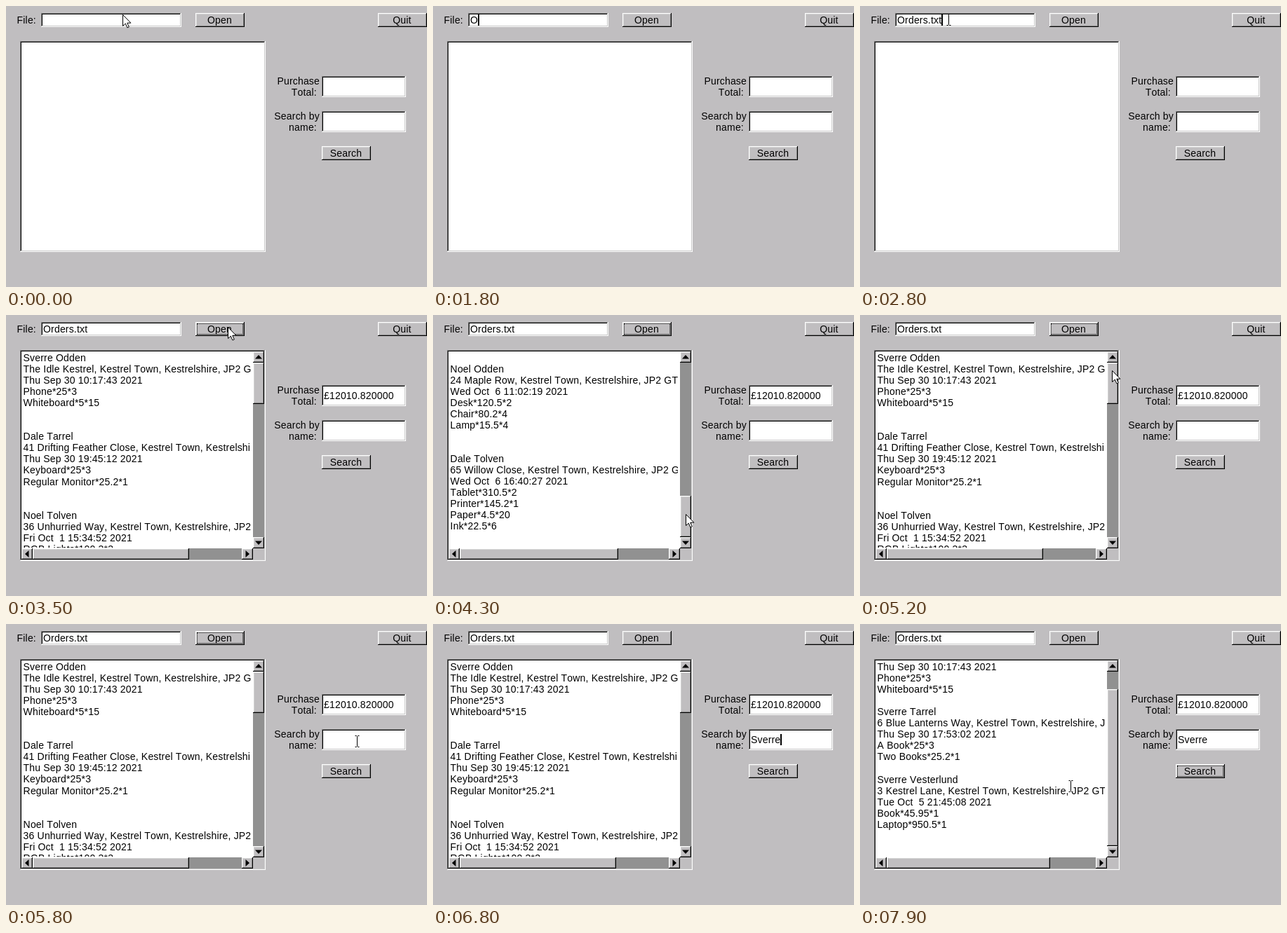
Write an HTML page that moves like this. It is 600 px wide and 401 px high and loops after 8 s.

```html
<!DOCTYPE html>
<html lang="en">
<head>
<meta charset="utf-8">
<title>Order viewer</title>
<style>
  html, body { margin: 0; width: 100%; height: 100%; overflow: hidden; background: #c0bec0; }
  body { position: relative; font: 14px/16px "Liberation Sans", Arial, sans-serif; font-kerning: none; letter-spacing: .18px; color: #000; white-space: pre; }
  div, svg { position: absolute; box-sizing: border-box; }
  .up { background: #c0bec0; box-shadow: inset -1px -1px #000, inset 1px 1px #fff, inset -2px -2px #808080, inset 2px 2px #d4d4d4; }
  .down, .pressed { background: #fff; box-shadow: inset -1px -1px #fff, inset 1px 1px #808080, inset -2px -2px #c8c8c8, inset 2px 2px #000; }
  .pressed { background: #b4b3b4; }
  .button { width: 70px; height: 20px; padding-right: 1px; line-height: 20px; text-align: center; }
  .focus { outline: 1px dotted #000; outline-offset: -3px; }
  .input { padding-left: 3px; overflow: hidden; }
  .label { right: calc(100% - 447px); text-align: right; }
  .caret::after { content: ""; display: inline-block; width: 2px; height: 16px; vertical-align: top; background: #000; }
  .trough { background: #919191; }
  .arrow { width: 16px; height: 16px; }
  .arrow::after { content: ""; position: absolute; inset: 3px; background: #000; clip-path: polygon(50% 20%, 100% 75%, 0 75%); rotate: var(--turn, 0deg); }
</style>
</head>
<body>
<div class="label" style="right:calc(100% - 47px);top:12px">File: </div>
<div class="label" style="top:99px">Purchase
Total: </div>
<div class="label" style="top:149px">Search by
name: </div>
<div id="file" class="down input" style="left:50px;top:10px;width:200px;height:20px;padding-top:2px"></div>
<div id="total" class="down input" style="left:450px;top:100px;width:120px;height:30px;padding-top:7px"></div>
<div id="name" class="down input" style="left:450px;top:150px;width:120px;height:30px;padding-top:7px"></div>
<div id="open" class="up button" style="left:270px;top:10px">Open</div>
<div class="up button" style="left:530px;top:10px">Quit</div>
<div id="search" class="up button" style="left:450px;top:200px">Search</div>
<div class="down" style="left:20px;top:50px;width:350px;height:301px"></div>
<div style="left:24.6px;top:53px;width:324.4px;height:279px;overflow:hidden"><div id="text" style="line-height:16.05px"></div></div>
<div id="bars" style="left:0;top:0">
  <div class="trough" style="left:352px;top:52px;width:16px;height:281px"></div>
  <div class="trough" style="left:22px;top:333px;width:330px;height:16px"></div>
  <div style="left:352px;top:333px;width:16px;height:16px;background:#c0bec0"></div>
  <div class="up arrow" style="left:352px;top:52px"></div>
  <div class="up arrow" style="left:352px;top:317px;--turn:180deg"></div>
  <div class="up arrow" style="left:22px;top:333px;--turn:270deg"></div>
  <div class="up arrow" style="left:336px;top:333px;--turn:90deg"></div>
  <div id="vthumb" class="up" style="left:352px;width:16px"></div>
  <div id="hthumb" class="up" style="left:38px;top:333px;height:16px"></div>
</div>
<svg id="pointer" width="14" height="21" viewBox="-.5 -.5 14 21" style="overflow:visible">
  <path id="arrow" d="M0 0V16L3.8 12.6L6.4 18.4L8.8 17.4L6.3 11.7H11.4Z" fill="#fff" stroke="#000"/>
  <path id="beam" d="M-3 -8H-1L0 -7L1 -8H3M0 -7V7M-3 8H-1L0 7L1 8H3" fill="none" stroke="#000"/>
</svg>
<script>
const $ = id => document.getElementById(id);
const LOOP = 8000, STEP = 100, ROWS = 18, TRACK = 249, TOP = 68, GRAB_Y = 92;
const FILE = "Orders.txt", QUERY = "Sverre";

// name | house | date | items
const records = [
  "Sverre Odden|The Idle Kestrel|Thu Sep 30 10:17:43 2021|Phone*25*3|Whiteboard*5*15",
  "Dale Tarrel|41 Drifting Feather Close|Thu Sep 30 19:45:12 2021|Keyboard*25*3|Regular Monitor*25.2*1",
  "Noel Tolven|36 Unhurried Way|Fri Oct  1 15:34:52 2021|RGB Lights*100.3*3|RGB Mouse*50.2*1",
  "Dale Vesterlund|17 Amber Row|Sat Oct  2 09:21:35 2021|Linked Lists*90.23*3|Vectors*50.21*10|",
  "Dale Odden|53 Corn Harvested Way|Fri Sep 24 12:11:11 2021|Your Code Sucks*50.6*2",
  "Noel Vesterlund|82 Fox Lane|Mon Oct  4 10:36:47 2021|RGB Keyboard*100.01*1|RGB Speakers*100.2*1|RGB Lights*100.3*10|RGB Monitor*500.5*2",
  "Sverre Tarrel|6 Blue Lanterns Way|Thu Sep 30 17:53:02 2021|A Book*25*3|Two Books*25.2*1",
  "Sverre Vesterlund|3 Kestrel Lane|Tue Oct  5 21:45:08 2021|Book*45.95*1|Laptop*950.5*1",
  "Noel Odden|24 Maple Row|Wed Oct  6 11:02:19 2021|Desk*120.5*2|Chair*80.2*4|Lamp*15.5*4",
  "Dale Tolven|65 Willow Close|Wed Oct  6 16:40:27 2021|Tablet*310.5*2|Printer*145.2*1|Paper*4.5*20|Ink*22.5*6"
].map(r => {
  const lines = r.split("|");
  lines[1] += ", Kestrel Town, Kestrelshire, JP2 GTS, UK";
  return lines.join("\n");
});
const orders = { text: records.join("\n\n\n"), rows: 75 };
const found = { text: records.filter(r => r.startsWith(QUERY)).join("\n\n"), rows: 20 };

// pointer path: time, x, y
const path = [
  [0, 166, 12], [100, 166, 12], [400, 140, 20], [600, 140, 20], [1000, 66, 19], [1200, 62, 19],
  [2700, 62, 19], [3100, 316, 17], [3500, 316, 17], [3800, 360, 92], [3900, 360, 92],
  [4300, 360, 284], [4400, 360, 284], [4700, 360, 172], [5000, 359, 92], [5200, 359, 79],
  [5300, 359, 79], [5800, 500, 167], [6800, 500, 167], [7100, 485, 211], [7300, 485, 211],
  [7700, 300, 231], [8000, 300, 231]
];
const textAreas = [[50, 10, 250, 30], [22, 52, 352, 333], [450, 100, 570, 130], [450, 150, 570, 180]];

const within = (t, a, b) => t >= a && t < b;
const clamp = (v, a, b) => Math.max(a, Math.min(b, v));
const typed = (s, t, start) => s.slice(0, clamp((t - start) / STEP + 1, 0, s.length));

function pointerAt(t) {
  const i = path.findIndex(p => p[0] > t), [t0, x0, y0] = path[i - 1], [t1, x1, y1] = path[i];
  const k = (t - t0) / (t1 - t0);
  return [Math.round(x0 + (x1 - x0) * k), Math.round(y0 + (y1 - y0) * k)];
}

function setField(id, text, caret) {
  $(id).textContent = text;
  $(id).classList.toggle("caret", caret);
}

function setButton(id, down, focus) {
  $(id).className = "button " + (down ? "pressed" : "up") + (focus ? " focus" : "");
}

function drawList(t, y) {
  const loaded = t >= 3300, searched = t >= 7300;
  const list = searched ? found : orders, range = list.rows - ROWS;
  const size = Math.floor(TRACK * ROWS / list.rows);
  let line = 0;
  if (within(t, 3800, 5400)) line = clamp(Math.round((y - GRAB_Y) / (TRACK - size) * range), 0, range);
  if (t >= 7800) line = range;
  $("bars").style.display = loaded ? "" : "none";
  $("text").textContent = loaded ? list.text : "";
  $("text").style.top = Math.round(-line * 16.05) + "px";
  $("vthumb").style.top = Math.round(TOP + line / range * (TRACK - size)) + "px";
  $("vthumb").style.height = size + "px";
  $("hthumb").style.width = (searched ? 233 : line > 8 ? 226 : 223) + "px";
}

function drawPointer(t, x, y) {
  const beam = t >= 200 && textAreas.some(([l, u, r, d]) => within(x, l, r) && within(y, u, d));
  const hidden = within(t, 1800, 2800) || within(t, 6000, 6900);
  $("pointer").style.display = hidden ? "none" : "";
  $("pointer").style.left = x + "px";
  $("pointer").style.top = y + "px";
  $("beam").style.display = beam ? "" : "none";
  $("arrow").style.display = beam ? "none" : "";
}

function frame(now) {
  const t = Math.floor(now % LOOP / STEP) * STEP;
  const [x, y] = pointerAt(t);
  setField("file", typed(FILE, t, 1800), within(t, 1300, 3200));
  setField("name", typed(QUERY, t, 6000), within(t, 5900, 7200));
  setField("total", t >= 3300 ? "£12010.820000" : "", false);
  setButton("open", t === 3200, within(t, 3200, 5900));
  setButton("search", t === 7200, t >= 7200);
  drawList(t, y);
  drawPointer(t, x, y);
  requestAnimationFrame(frame);
}
requestAnimationFrame(frame);
</script>
</body>
</html>
```
